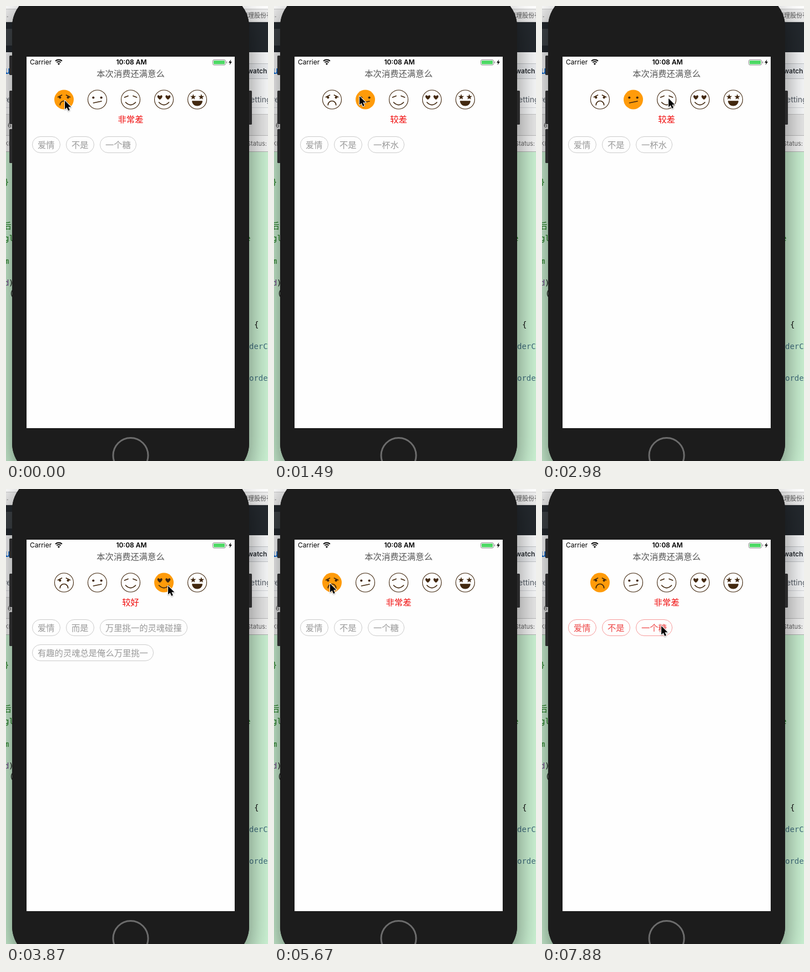
Animation, 472 px wide and 817 px high, one loop 8 s. Source, as an HTML page with a canvas:

```html
<!DOCTYPE html>
<html lang="zh">
<head>
<meta charset="utf-8">
<style>
html, body { margin: 0; width: 100%; height: 100%; overflow: hidden; background: #fff; }
canvas { display: block; width: 472px; height: 817px; }
</style>
</head>
<body>
<canvas id="stage"></canvas>
<script>
const W = 472, H = 817, LOOP = 8000;
const BROWN = '#42280f', ORANGE = '#ff9b0a';
const CJK = '"Noto Sans CJK SC", "Noto Sans CJK JP", "Noto Sans CJK", sans-serif';
const UI = 'Inter, Roboto, sans-serif';
const MONO = '"DejaVu Sans Mono", monospace';

const canvas = document.getElementById('stage');
const dpr = window.devicePixelRatio || 1;
canvas.width = W * dpr;
canvas.height = H * dpr;
let g = canvas.getContext('2d');

const backdrop = document.createElement('canvas');
backdrop.width = canvas.width;
backdrop.height = canvas.height;

const ratings = [
  { label: '非常差', tags: ['爱情', '不是', '一个糖'] },
  { label: '较差', tags: ['爱情', '不是', '一杯水'] },
  { label: '一般', tags: ['爱情', '而是', '好看的皮囊总是会千篇一律'] },
  { label: '较好', tags: ['爱情', '而是', '万里挑一的灵魂碰撞', '有趣的灵魂总是俺么万里挑一'] },
  { label: '非常好', tags: ['我们', '遇见', '即珍惜'] }
];
const picks = [[0, 0], [1490, 1], [3120, 2], [3870, 3], [4620, 4], [5670, 0]];
const tagTaps = [6400, 7130, 7880];

// Cursor moves: first step, last step, step count, bend point, end point
const moves = [
  [290, 1190, 7, [235, 234], [154, 162]],
  [1640, 1930, 3, [160, 176], [182, 182]],
  [2380, 2980, 5, [208, 178], [228, 166]],
  [3270, 3420, 2, [260, 170], [290, 174]],
  [3570, 3570, 1, [291, 174], [292, 174]],
  [4170, 4320, 2, [318, 175], [340, 172]],
  [4770, 5370, 5, [225, 178], [101, 170]],
  [5820, 6100, 3, [92, 215], [86, 258]],
  [6690, 6840, 2, [112, 257], [134, 254]],
  [7280, 7580, 3, [175, 254], [215, 246]]
];

function text(str, x, y, font, color, align = 'left') {
  g.font = font;
  g.fillStyle = color;
  g.textAlign = align;
  g.textBaseline = 'alphabetic';
  g.fillText(str, x, y);
}

function rect(x, y, w, h, color) {
  g.fillStyle = color;
  g.fillRect(x, y, w, h);
}

function pill(x, y, w, h, r) {
  g.beginPath();
  g.roundRect(x, y, w, h, r);
}

function line(x1, y1, x2, y2) {
  g.beginPath();
  g.moveTo(x1, y1);
  g.lineTo(x2, y2);
  g.stroke();
}

function dot(x, y, r) {
  g.beginPath();
  g.arc(x, y, r, 0, Math.PI * 2);
  g.fill();
}

function polygon(points) {
  g.beginPath();
  points.forEach(([x, y]) => g.lineTo(x, y));
  g.closePath();
}

function drawDesktop() {
  rect(0, 0, W, H, '#fff');
  rect(0, 5, W, 24, '#ececec');
  rect(0, 5, W, 1, '#c9c9c9');
  rect(0, 28, W, 1, '#cfcfcf');
  text('..', -2, 20, '11px ' + UI, '#555');
  text('管理股份有', 425, 21, '11px ' + CJK, '#555');
  rect(0, 29, W, 54, '#24292e');
  rect(0, 41, 14, 30, '#3f4448');
  rect(0, 83, W, 112, '#fafbfc');
  text('u', -3, 122, '600 18px ' + UI, '#0366d6');
  rect(430, 103, 42, 28, '#eff1f4');
  rect(430, 103, 42, 1, '#c5c8cb');
  rect(430, 130, 42, 1, '#c5c8cb');
  text('watch', 435, 121, '600 12px ' + UI, '#24292e');
  text('re', -4, 173, '14px ' + UI, '#586069');
  text('ettings', 440, 173, '14px ' + UI, '#586069');
  rect(0, 182, W, 1, '#d8dade');
  rect(0, 195, W, 38, '#e9e9e9');
  rect(0, 194, W, 1, '#c6c6c6');
  text('6', 3, 218, '11px ' + UI, '#555');
  rect(0, 232, W, 1, '#bdbdbd');
  rect(0, 233, W, 28, '#f6f6f6');
  text('KF', -3, 251, '11px ' + UI, '#777');
  text('Status:', 434, 251, '11px ' + UI, '#666');
  rect(0, 261, W, 1, '#b5b5b5');
  rect(0, 262, W, H - 262, '#cdf4d5');

  const code = (str, x, y, color) => text(str, x, y, '14px ' + MONO, color);
  code('}', -3, 321, '#187a18');
  text('后', -5, 400, '14.5px ' + CJK, '#187a18');
  code('gl', -3, 422, '#187a18');
  code('m', -3, 463, '#187a18');
  code('d', -3, 502, '#6f4189');
  code(')', 5, 502, '#111');
  code('(', 6, 521, '#111');
  code('e', 432, 422, '#187a18');
  code('{', 447, 577, '#111');
  code('derC', 438, 616, '#427080');
  code('orde', 438, 673, '#427080');
}

function drawPhone() {
  g.save();
  g.shadowColor = 'rgba(0,0,0,.5)';
  g.shadowBlur = 50 * dpr;
  g.shadowOffsetY = 20 * dpr;
  g.fillStyle = '#1c1c1c';
  pill(11, -23, 427, 868, 60);
  g.fill();
  g.restore();

  g.fillStyle = '#2b2b2c';
  for (const [x, y, h] of [[6, 89, 35], [6, 152, 60], [6, 221, 61], [437, 152, 61]]) {
    pill(x, y, 6, h, 1.5);
    g.fill();
  }
  g.fillStyle = '#1c1c1c';
  pill(11, -23, 427, 868, 60);
  g.fill();

  rect(37, 91, 375, 667, '#fefefe');
  g.strokeStyle = '#6c6c6c';
  g.lineWidth = 3;
  g.beginPath();
  g.arc(224.5, 807, 31.5, 0, Math.PI * 2);
  g.stroke();
}

function drawStatusBar() {
  text('Carrier', 43, 105, '12px ' + UI, '#000');
  text('10:08 AM', 226, 105, '600 12px ' + UI, '#000', 'center');

  g.strokeStyle = g.fillStyle = '#000';
  g.lineWidth = 2;
  const a = Math.PI * 1.27, b = Math.PI * 1.73;
  for (const r of [9, 5.5]) {
    g.beginPath();
    g.arc(95, 105.5, r, a, b);
    g.stroke();
  }
  g.beginPath();
  g.moveTo(95, 106);
  g.arc(95, 105.8, 3.2, a, b);
  g.fill();

  g.strokeStyle = '#8c8c8c';
  g.lineWidth = 1;
  pill(372.5, 96.5, 23, 9.5, 2.5);
  g.stroke();
  g.fillStyle = '#4cd964';
  pill(374, 98, 20, 6.5, 1);
  g.fill();
  rect(397, 99.5, 1.2, 3.5, '#8c8c8c');
  g.fillStyle = '#000';
  polygon([[405.3, 96], [401, 101.8], [403.7, 101.8], [402.6, 106], [407, 100], [404.3, 100]]);
  g.fill();
}

function heart(x, y) {
  g.beginPath();
  g.moveTo(x, y + 4.3);
  g.bezierCurveTo(x - 8, y - 1, x - 3.5, y - 6.5, x, y - 2);
  g.bezierCurveTo(x + 3.5, y - 6.5, x + 8, y - 1, x, y + 4.3);
  g.fill();
}

function star(x, y) {
  const points = [];
  for (let i = 0; i < 10; i++) {
    const r = i % 2 ? 2.2 : 5.4, a = i * Math.PI / 5 - Math.PI / 2;
    points.push([x + r * Math.cos(a), y + r * Math.sin(a)]);
  }
  polygon(points);
  g.fill();
}

function smile() {
  g.beginPath();
  g.moveTo(-9, 5);
  g.quadraticCurveTo(0, 14, 9, 5);
  g.stroke();
}

const features = [
  () => {
    for (const s of [-1, 1]) {
      line(s * 11, -4.5, s * 4, -8);
      dot(s * 7.2, -3.7, 2.1);
    }
    g.beginPath();
    g.arc(0, 9.7, 7.2, Math.PI, 0);
    g.stroke();
  },
  () => {
    dot(-7.2, -3.5, 2.1);
    dot(7.2, -3.5, 2.1);
    line(-7, 6, 7.5, 3);
  },
  () => {
    for (const s of [-1, 1]) line(s * 11, -4, s * 4.5, -6.5);
    smile();
  },
  () => {
    heart(-7.3, -4);
    heart(7.3, -4);
    smile();
  },
  () => {
    star(-7.3, -4.5);
    star(7.3, -4.5);
    g.beginPath();
    g.moveTo(-9.5, 2.2);
    g.lineTo(9.5, 2.2);
    g.bezierCurveTo(9, 14.5, -9, 14.5, -9.5, 2.2);
    g.fill();
  }
];

function drawFace(i, on) {
  g.save();
  g.translate(104.5 + 60 * i, 168);
  g.beginPath();
  g.arc(0, 0, on ? 17.5 : 17, 0, Math.PI * 2);
  if (on) {
    g.fillStyle = ORANGE;
    g.fill();
  } else {
    g.strokeStyle = BROWN;
    g.lineWidth = 1.1;
    g.stroke();
  }
  g.fillStyle = g.strokeStyle = BROWN;
  g.lineWidth = 1.7;
  g.lineCap = 'round';
  features[i]();
  g.restore();
}

function drawTags(tags, t) {
  let x = 47, y = 234;
  tags.forEach((tag, i) => {
    const w = Math.round(20 + 15.3 * tag.length);
    if (x + w > 402) {
      x = 47;
      y += 45;
    }
    const on = t >= tagTaps[i];
    g.strokeStyle = on ? '#f79a9a' : '#cbcbcb';
    g.lineWidth = 1;
    pill(x + 0.5, y + 0.5, w - 1, 29, 14.5);
    g.stroke();
    text(tag, x + 10, y + 21, '15.3px ' + CJK, on ? '#ee4545' : '#999');
    x += w + 10;
  });
}

function cursorAt(t) {
  let from = [106, 170];
  for (const [start, end, steps, bend, to] of moves) {
    if (t < start) break;
    if (t < end) {
      const gap = (end - start) / (steps - 1);
      const u = (Math.floor((t - start) / gap + 0.02) + 1) / steps;
      return from.map((p, i) =>
        p * (1 - u) ** 2 + 2 * bend[i] * u * (1 - u) + to[i] * u * u);
    }
    from = to;
  }
  return from;
}

function drawCursor([x, y]) {
  g.save();
  g.translate(Math.round(x), Math.round(y));
  polygon([[0, 0], [0, 15.5], [3.6, 12.2], [6.2, 18], [8.8, 16.8], [6.3, 11.3], [11.3, 11.3]]);
  g.strokeStyle = '#fff';
  g.lineWidth = 2;
  g.lineJoin = 'round';
  g.shadowColor = 'rgba(0,0,0,.3)';
  g.shadowBlur = 2 * dpr;
  g.shadowOffsetY = dpr;
  g.stroke();
  g.shadowColor = 'transparent';
  g.fillStyle = '#000';
  g.fill();
  g.restore();
}

function paintBackdrop() {
  const main = g;
  g = backdrop.getContext('2d');
  g.scale(dpr, dpr);
  drawDesktop();
  drawPhone();
  drawStatusBar();
  text('本次消费还满意么', 224.5, 126.5, '15.3px ' + CJK, '#555', 'center');
  g = main;
}

function draw(t) {
  g.setTransform(1, 0, 0, 1, 0, 0);
  g.drawImage(backdrop, 0, 0);
  g.scale(dpr, dpr);
  const mood = picks.filter(([time]) => t >= time).pop()[1];
  for (let i = 0; i < 5; i++) drawFace(i, i === mood);
  text(ratings[mood].label, 224.5, 208.5, '15.3px ' + CJK, '#f00a0a', 'center');
  drawTags(ratings[mood].tags, t);
  drawCursor(cursorAt(t));
}

paintBackdrop();
const begin = performance.now();
function frame() {
  draw((performance.now() - begin) % LOOP);
  requestAnimationFrame(frame);
}
frame();
</script>
</body>
</html>
```
